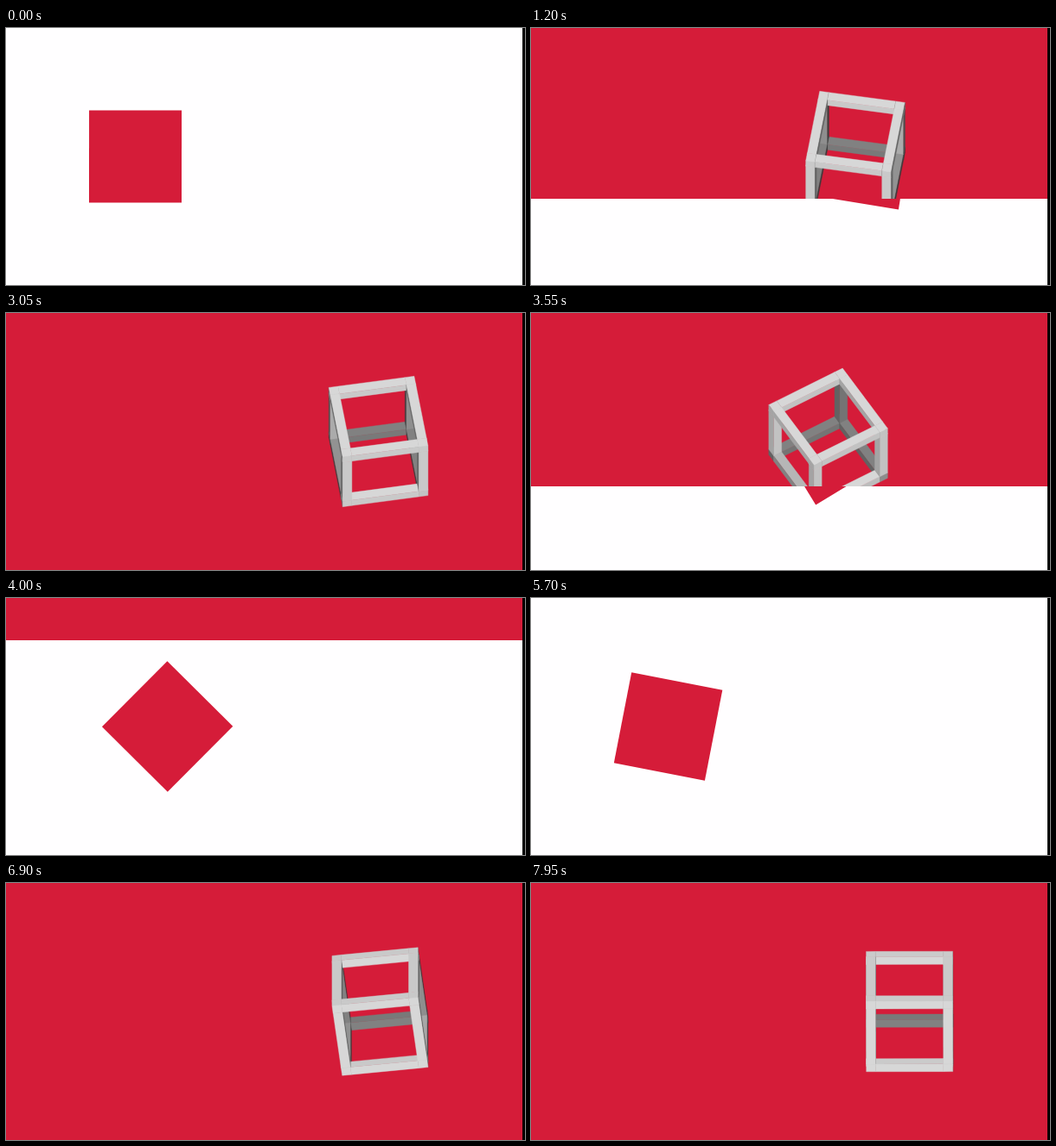
Recreate the animation shown at these times as an HTML page with a canvas. Size 600 by 298 pixels, loop 8000 ms.

```html
<!DOCTYPE html>
<html lang="en">
<head>
<meta charset="utf-8">
<title>Square and cube</title>
<style>
  html, body { margin: 0; width: 100%; height: 100%; overflow: hidden; background: #000; }
  canvas { display: block; }
</style>
</head>
<body>
<canvas id="stage" width="600" height="298"></canvas>
<script>
const ctx = document.getElementById('stage').getContext('2d');
const RED = '#d51c39', WHITE = '#fffeff';
const WIDTH = 597, HEIGHT = 298, CENTER_Y = 149;
const LOOP = 8000, CYCLE = 5273, OFFSET = 133;
const SQUARE = 107, CUBE = 100, BAR = 10.8;
const SIN_TILT = Math.sqrt(2 / 3), COS_TILT = Math.sqrt(1 / 3);

const clamp = (v, low, high) => Math.min(high, Math.max(low, v));
const ramp = (t, start, duration) => clamp((t - start) / duration, 0, 1);
const easeQuart = u => u < 0.5 ? 8 * u ** 4 : 1 - 8 * (1 - u) ** 4;

// Grid cells of the cube frame: 8 corners and 12 bars.
const cells = [];
for (let x = -1; x <= 1; x++)
  for (let y = -1; y <= 1; y++)
    for (let z = -1; z <= 1; z++)
      if ([x, y, z].filter(v => v === 0).length < 2) cells.push([x, y, z]);

const inner = CUBE / 2 - BAR;
const span = i => i < 0 ? [-CUBE / 2, -inner] : i > 0 ? [inner, CUBE / 2] : [-inner, inner];
const dot = (a, b) => a[0] * b[0] + a[1] * b[1] + a[2] * b[2];

function drawCube(cx, angle, side) {
  const c = Math.cos(angle), s = Math.sin(angle);
  const project = ([x, y, z]) => [
    cx + x * c - z * s,
    CENTER_Y + (x * s + z * c) * SIN_TILT - y * COS_TILT
  ];
  // Direction towards the viewer; side is 1 from above, -1 from below.
  const view = [s * COS_TILT, SIN_TILT, c * COS_TILT].map(v => v * side);

  const ordered = [...cells].sort((a, b) => dot(a, view) - dot(b, view));
  for (const cell of ordered) {
    const spans = cell.map(span);
    for (let axis = 0; axis < 3; axis++) {
      const facing = Math.abs(view[axis]);
      if (facing < 1e-6) continue;
      const [j, k] = [(axis + 1) % 3, (axis + 2) % 3];
      const corners = [[0, 0], [1, 0], [1, 1], [0, 1]].map(([a, b]) => {
        const p = [];
        p[axis] = spans[axis][view[axis] > 0 ? 1 : 0];
        p[j] = spans[j][a];
        p[k] = spans[k][b];
        return p;
      });
      fillFace(corners, facing, view, project);
    }
  }
}

// Faces turned away from the viewer or lying deep inside are darker.
function fillFace(corners, facing, view, project) {
  const base = 50 + 175 * (1 - Math.exp(-3.5 * facing));
  const depth = corners.reduce((sum, p) => sum + dot(p, view), 0) / 4;
  const gray = Math.round(base * clamp(1 + (depth + 10) * 0.018, 0.6, 1));
  ctx.beginPath();
  for (const p of corners) ctx.lineTo(...project(p));
  ctx.closePath();
  ctx.fillStyle = ctx.strokeStyle = `rgb(${gray},${gray},${gray})`;
  ctx.lineWidth = 0.4;
  ctx.fill();
  ctx.stroke();
}

function drawSquare(cx, angle) {
  ctx.translate(cx, CENTER_Y);
  ctx.rotate(angle);
  ctx.fillStyle = RED;
  ctx.fillRect(-SQUARE / 2, -SQUARE / 2, SQUARE, SQUARE);
}

function panel(top, bottom, color, draw) {
  if (bottom <= top) return;
  ctx.save();
  ctx.beginPath();
  ctx.rect(0, top, WIDTH, bottom - top);
  ctx.clip();
  ctx.fillStyle = color;
  ctx.fillRect(0, top, WIDTH, bottom - top);
  draw();
  ctx.restore();
}

function render() {
  const time = performance.now() % LOOP + OFFSET;
  const t = time % CYCLE;
  const side = time < CYCLE ? 1 : -1;
  const progress = easeQuart(ramp(t, 0, 2258)) - easeQuart(ramp(t, 2631, 2324));
  const split = Math.round(HEIGHT * (ramp(t, 735, 900) - ramp(t, 3398, 880)));
  const angle = progress * 2 * Math.PI;

  ctx.fillStyle = '#000';
  ctx.fillRect(0, 0, 600, HEIGHT);
  panel(0, split, RED, () => drawCube(158.5 + 279.2 * progress, angle, side));
  panel(split, HEIGHT, WHITE, () => drawSquare(149.5 + 298 * progress, angle));
  requestAnimationFrame(render);
}
render();
</script>
</body>
</html>
```
